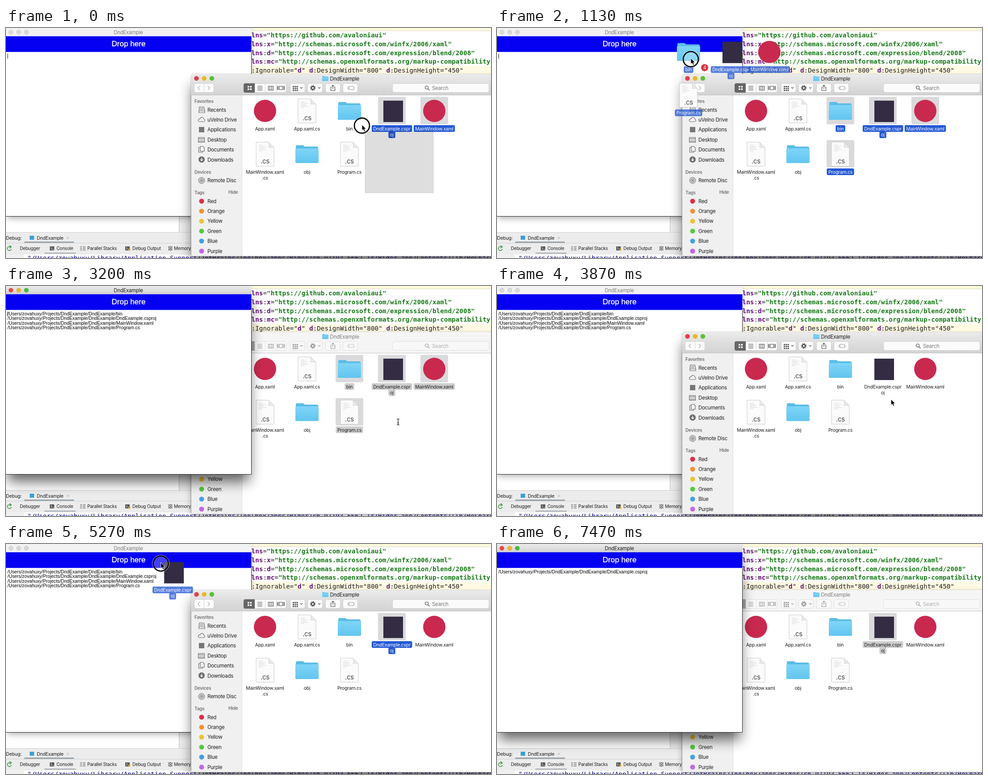
An HTML page for the animation above (7540 ms loop, 1086 px wide and 516 px high).

```html
<!DOCTYPE html>
<html lang="en">
<head>
<meta charset="utf-8">
<title>Drag and drop</title>
<style>
html, body { margin: 0; width: 100%; height: 100%; overflow: hidden; background: #fff; }
svg { display: block; width: 1086px; height: 516px; }
text { font-family: Inter, Roboto, sans-serif; font-size: 11.4px; letter-spacing: -.02em; fill: #1c1c1c; white-space: pre; }
.mid { text-anchor: middle; }
.code { font-family: "DejaVu Sans Mono", monospace; font-size: 14.33px; letter-spacing: 0; }
.ns { fill: #660e7a; font-weight: bold; }
.str { fill: #177a17; font-weight: bold; }
.path { font-family: "Liberation Sans", Arial, sans-serif; font-size: 10.35px; letter-spacing: 0; fill: #000; }
.tool { font-size: 10px; }
.head { font-size: 10px; font-weight: 600; fill: #707070; }
.label text { font-size: 10.4px; text-anchor: middle; }
.box, .tag { visibility: hidden; }
.on .box, .off .box, .on .tag, .off .tag { visibility: inherit; }
.on .tag { fill: #2458d3; }
.off .tag { fill: #cecece; }
.on text.name { fill: #fff; }
.ghost .box { visibility: hidden; }
.btn { fill: #fbfbfb; stroke: #cfcfcf; }
.ico { fill: none; stroke: #555; stroke-width: 1.2; }
.side { fill: none; stroke: #6c6c6c; stroke-width: 1.2; }
.idle .tools { opacity: .55; }
.idle .caption { fill: #7c7c7c; }
</style>
</head>
<body>
<svg id="stage" viewBox="0 0 1086 516" xmlns="http://www.w3.org/2000/svg">
<defs>
  <linearGradient id="bar" x2="0" y2="1"><stop stop-color="#ebebeb"/><stop offset="1" stop-color="#d2d2d2"/></linearGradient>
  <linearGradient id="sky" x2="0" y2="1"><stop stop-color="#7fd5f7"/><stop offset="1" stop-color="#62c5ef"/></linearGradient>
  <filter id="deep" filterUnits="userSpaceOnUse" x="-100" y="-100" width="1300" height="750"><feGaussianBlur stdDeviation="15"/></filter>
  <filter id="light" filterUnits="userSpaceOnUse" x="-100" y="-100" width="1300" height="750"><feGaussianBlur stdDeviation="8"/></filter>
</defs>
</svg>
<script>
const LOOP = 7540, STEP = 1000 / 15;
const USER = 'zovahuxy';
const stage = document.getElementById('stage');

const rect = (x, y, w, h, fill, more = '') => `<rect x="${x}" y="${y}" width="${w}" height="${h}" fill="${fill}" ${more}/>`;
const line = (d, more = 'class="ico"') => `<path d="${d}" ${more}/>`;
const dot = (x, y, r, fill, more = '') => `<circle cx="${x}" cy="${y}" r="${r}" fill="${fill}" ${more}/>`;
const text = (x, y, s, more = '') => `<text x="${x}" y="${y}" ${more}>${s}</text>`;
const span = (cls, s) => `<tspan class="${cls}">${s}</tspan>`;

// Code editor and debug panel behind both windows
function ide() {
  const xmlns = (p, url) => span('ns', 'lns') + (p ? ':' + span('ns', p) : '') + '=' + span('str', `"${url}"`);
  const ms = 'http://schemas.microsoft.com/';
  const rows = [
    xmlns('', 'https://github.com/avaloniaui'),
    xmlns('x', ms + 'winfx/2006/xaml'),
    xmlns('d', ms + 'expression/blend/2008'),
    xmlns('mc', 'http://schemas.openxmlformats.org/markup-compatibility/2006'),
    ':Ignorable="' + span('ns', 'd') + '" ' + span('ns', 'd') + ':DesignWidth="800" ' + span('ns', 'd') + ':DesignHeight="450"'
  ];
  const tabs = [[31, 'Debugger'], [113, 'Console'], [182, 'Parallel Stacks'], [283, 'Debug Output'], [376, 'Memory']];
  const log = `"/Users/${USER}/Library/Application Support/JetBrains/Toolbox/apps/Rider/ch-0/193.5662.14/Rider.app/Contents/lib/ReSharperHost`;
  return rect(0, 0, 1086, 516, '#fff') +
    rect(540, 0, 546, 6, '#fbf8dc') + line('M540 6.5H1086', 'stroke="#dedbc4"') +
    rect(540, 85, 546, 20, '#fffae3') +
    rows.map((r, i) => text(549.5, 21 + i * 19.8, r, 'class="code"')).join('') +
    rect(388, 400, 30, 59, '#ebebeb') + line('M387.5 400V459', 'stroke="#bdbdbd"') +
    rect(0, 459, 1086, 49, '#ececec') + line('M0 458.5H1086M0 482.5H1086', 'stroke="#d0d0d0"') +
    rect(0, 508, 40, 8, '#f0f0f0') +
    text(0, 475, 'Debug:', 'style="font-size:10.6px"') + rect(53, 466, 10, 9, '#3d9fd6') +
    text(69, 475, 'DndExample', 'style="font-size:10.4px"') +
    line('M136 468.500l5 5m0-5l-5 5', 'stroke="#aaa"') + rect(41, 479, 111, 3, '#9ba5ad') +
    tabs.map(([x, s]) => text(x, 498, s, 'class="tool"')).join('') +
    rect(86, 504, 70, 2, '#9ba5ad') +
    line('M10 491a4.500 4.500 0 1 0 2 5M8 488l4 3-4 3', 'fill="none" stroke="#4d9b51" stroke-width="1.7"') +
    rect(98, 490, 10, 9, '#555') + line('M100 492l3 2.500-3 2.500M104 497h3', 'stroke="#fff" fill="none"') +
    line('M166 491h4M166 494.500h4M166 498h4M172 491h6M172 494.500h6M172 498h6', 'stroke="#777" stroke-width="1.5"') +
    rect(267, 490, 10, 9, '#555') + line('M269 492l3 2.500-3 2.500', 'stroke="#fff" fill="none"') + dot(276, 497, 2.5, '#d99a28') +
    dot(368, 494.5, 3.5, 'none', 'class="ico"') + dot(368, 494.5, 1.5, '#444') +
    line('M363 491h3M363 498h3M370 491h3M370 498h3M368 489v2M368 498v2') +
    text(48, 521, log, 'class="code" style="fill:#000080"');
}

const folder = (x, y) => `<g transform="translate(${x} ${y})">` +
  line('M-25-17q0-3 3-3h13l4 3h27q3 0 3 3v10h-50z', 'fill="#5bbde6"') +
  rect(-26, -13, 52, 33, 'url(#sky)', 'rx="2"') + '</g>';

const page = (x, y) => {
  const rows = [0, 1, 2, 3, 4].map(i => `M-14 ${-20 + i * 3.2}h${[9, 15, 12, 17, 8][i]}`).join('');
  return `<g transform="translate(${x} ${y})">` +
    line('M-20-27H8L20-15V27H-20Z', 'fill="#fbfbfb" stroke="#c9c9c9"') +
    line('M8-27Q10-18 8-15Q14-16 20-15Z', 'fill="#e9e9e9" stroke="#d2d2d2"') +
    line(rows, 'stroke="#cdcdcd" stroke-width=".8"') +
    text(0, 21, '.cs', 'class="mid" style="font-size:15px;fill:#444"') + '</g>';
};
const round = (x, y) => dot(x, y, 25, '#c9294f');
const square = (x, y) => rect(x - 19, y - 23, 44, 48, '#332c43');

const files = {
  app: [580, 186, round, ['App.xaml']],
  appCs: [674, 186, page, ['App.xaml.cs']],
  bin: [769, 186, folder, ['bin']],
  proj: [864, 186, square, ['DndExample.cspr', 'oj']],
  main: [959, 186, round, ['MainWindow.xaml']],
  mainCs: [580, 283, page, ['MainWindow.xaml', '.cs']],
  obj: [674, 283, folder, ['obj']],
  prog: [769, 283, page, ['Program.cs']]
};

function item(key, cls = '') {
  const [x, y, icon, names] = files[key];
  return `<g class="${cls}" data-file="${key}">` + rect(x - 31, y - 31.5, 62, 61.5, '#dadadc', 'rx="3" class="box"') + icon(x, y) +
    '<g class="label">' + names.map((s, i) =>
      rect(x, y + 32 + i * 14, 0, 15, '#2458d3', 'rx="3" class="tag"') +
      text(x, y + 43.5 + i * 13.5, s, 'class="name"')).join('') + '</g></g>';
}

// Focused windows cast a deep shadow, others a light one
function shades(id, x, y, w, h) {
  return `<g id="${id}Deep" opacity=".6">` + rect(x + 4, y + 25, w - 8, h - 8, '#000', 'filter="url(#deep)"') + '</g>' +
    `<g id="${id}Light" opacity=".35">` + rect(x + 2, y + 8, w - 4, h - 4, '#000', 'filter="url(#light)"') + '</g>';
}

function appWindow() {
  return '<g id="app">' + shades('app', 0, 0, 549, 422) +
    rect(0, 0, 549.5, 422, '#fff') + rect(0, 0, 549.5, 19, '#f2f2f2', 'id="appBar"') +
    [11, 28.5, 45.5].map(x => dot(x, 9.5, 5, '#d9d9d9', 'class="light" stroke="#0002" stroke-width=".8"')).join('') +
    text(274, 14, 'DndExample', 'class="mid caption"') +
    rect(0, 18.5, 549.5, 35.2, '#0500f2') +
    text(274.5, 40.5, 'Drop here', 'class="path mid" style="font-size:17.1px;fill:#fff;stroke:#fff;stroke-width:.4"') +
    '<g id="lines"></g>' + rect(3.3, 57.5, 1, 11, '#000', 'id="caret"') +
    line('M0 422.500H549.500V54', 'fill="none" stroke="#222"') + '</g>';
}

function toolbar() {
  const btn = (x, w) => rect(x + .5, 124.5, w, 20, '#fbfbfb', 'class="btn" rx="4"');
  const grid = (x, y, step, n, m, s, fill) => {
    let out = '';
    for (let i = 0; i < n * m; i++) out += rect(x + (i % n) * step, y + (i / n | 0) * step, s, s, fill);
    return out;
  };
  const chev = x => line(`M${x} 133l2.500 2.500 2.500-2.500`);
  return '<g class="tools">' + btn(421, 44) + line('M443.500 125V144', 'stroke="#d5d5d5"') +
    line('M434 130l-4 4.500 4 4.500M452 130l4 4.500-4 4.500', 'fill="none" stroke="#b3b3b3" stroke-width="1.4"') +
    btn(532, 95) + line('M605.500 125V144M580.500 125V144', 'stroke="#d5d5d5"') +
    line('M557 124H536q-4 0-4 4v13q0 4 4 4h21z', 'fill="#666"') + grid(541, 130, 5.5, 2, 2, 3.5, '#fff') +
    line('M563 130.500h11M563 133.500h11M563 136.500h11M563 139.500h11') +
    line('M587.500 130.500h11v9h-11zM591 130.500v9M595 130.500v9') +
    line('M612 130.500h7v8h-7zM609.500 130v9M621.500 130v9M607.500 130v9M623.500 130v9') +
    btn(636, 33) + grid(642, 130, 4.3, 3, 3, 3, '#555') + chev(659) +
    btn(675, 33) + dot(687, 134.5, 3.4, 'none', 'stroke="#555" stroke-width="2.6"') +
    dot(687, 134.5, 5.4, 'none', 'stroke="#555" stroke-width="1.6" stroke-dasharray="2.1 2.14"') + chev(699) +
    btn(715, 33) + line('M729.500 132.500h-2v8h9v-8h-2M732 137v-9m-2.500 2.500l2.500-2.500 2.500 2.500') +
    btn(754, 33) + line('M768 131h9q2 0 2 2v3q0 2-2 2h-9l-3-3.500z', 'fill="none" stroke="#999" stroke-width="1.2"') + dot(768.5, 134.5, 1, '#999') +
    btn(865, 216) + dot(942, 133.5, 3.5, 'none', 'class="ico"') + line('M944.500 136l4 4') +
    text(954, 139, 'Search', 'style="fill:#777"') + '</g>';
}

function sidebar() {
  const places = ['Recents', 'uVelno Drive', 'Applications', 'Desktop', 'Documents', 'Downloads'];
  const tags = [['Red', '#db3049'], ['Orange', '#ee9430'], ['Yellow', '#eac436'], ['Green', '#55c940'], ['Blue', '#459fe0'], ['Purple', '#bf69e2']];
  return rect(414, 151, 114, 361, '#f0f0f0') + line('M528.500 151V512', 'stroke="#dcdcdc"') +
    text(422, 167.5, 'Favorites', 'class="head"') + text(422, 326.5, 'Devices', 'class="head"') +
    text(422, 373, 'Tags', 'class="head"') + text(498, 372, 'Hide', 'class="head"') +
    places.map((s, i) => text(451, 187.5 + i * 22.4, s)).join('') + text(451, 346, 'Remote Disc') +
    tags.map(([s, c], i) => text(451, 392.5 + i * 22.4, s) + dot(438, 388.5 + i * 22.4, 5.5, c)).join('') +
    line('M433 177h10l2 9v4h-13v-4zM432 186h13M434 180h8M434 183h8', 'class="side"') +
    line('M434 210q-4 0-3.500-3.500 1-3 4-2.500 1.500-4 5-3.500 3.500 1 3.500 4 3 1 2 4-1 1.500-2.500 1.500z', 'class="side"') +
    rect(432, 222, 12, 12, '#777') +
    rect(430.5, 245.5, 14, 11, '#ddd', 'stroke="#6c6c6c"') + line('M431 248.500h13M431 254h13', 'class="side"') +
    line('M435 265.500h6l3 3v8h-9zM435 268h-3.500v11h9v-2', 'class="side"') +
    dot(438, 295, 7, '#6c6c6c') + line('M438 291v7m-3-3l3 3 3-3', 'fill="none" stroke="#fff" stroke-width="1.5"') +
    dot(438, 342, 7, '#ccc', 'stroke="#777"') + dot(438, 342, 3.5, 'none', 'stroke="#888"') + dot(438, 342, 1.5, '#777');
}

function finder() {
  const lights = ['#e2414b', '#e9b828', '#5bc035'];
  return '<g id="finder">' + shades('finder', 414, 103, 690, 409) +
    rect(414, 103, 690, 409, '#fff', 'rx="5" stroke="#0003"') +
    line('M414 151V108q0-5 5-5H1090V151z', 'fill="url(#bar)" id="finderBar"') +
    line('M414 150.500H1086', 'stroke="#c3c3c3"') +
    lights.map((c, i) => dot(426.5 + i * 17.2, 113, 5.3, c)).join('') +
    `<g transform="translate(715 113.500) scale(.27)">${folder(0, 0)}</g>` +
    text(725.5, 117.5, 'DndExample', 'class="caption"') + toolbar() + sidebar() +
    Object.keys(files).map(k => item(k)).join('') +
    rect(0, 0, 0, 0, '#000', 'id="marquee" fill-opacity=".13" stroke="#000" stroke-opacity=".1"') +
    line('M414.500 150V507q0 5 5 5H1086', 'fill="none" stroke="#a9a9a9"') + '</g>';
}

function pointer() {
  return '<g id="ghosts">' + ['bin', 'proj', 'main', 'prog'].map(k => item(k, 'on ghost')).join('') + '</g>' +
    '<g id="badge">' + dot(0, 0, 8, '#dc303c') + text(0, 4, '4', 'class="mid" style="fill:#fff"') + '</g>' +
    '<g id="cursor"><g id="ring">' + dot(0, 0, 19, 'none', 'stroke="#fff" stroke-opacity=".7"') +
    dot(0, 0, 17, '#fff', 'fill-opacity=".25" stroke="#0a0a0a" stroke-width="2.8"') + '</g>' +
    line('M0-2V11l3-2.700 2 5 2.500-1-2-4.800h4z', 'id="arrow" fill="#000" stroke="#fff" stroke-width=".9"') +
    line('M-3-7q3 0 3 2.500V4.500q0 2.500-3 2.500M3-7q-3 0-3 2.500M0 4.500q0 2.500 3 2.500M-2 2H2', 'id="beam" fill="none" stroke="#111" stroke-width="1.2"') + '</g>';
}

stage.insertAdjacentHTML('beforeend', ide() + '<g id="windows">' + appWindow() + finder() + '</g>' + pointer());
const $ = id => document.getElementById(id);
const show = (el, on) => el.setAttribute('visibility', on ? 'inherit' : 'hidden');
const move = (el, x, y) => el.setAttribute('transform', `translate(${x} ${y})`);

for (const tag of stage.querySelectorAll('.tag')) {
  const b = tag.nextElementSibling.getBBox();
  tag.setAttribute('x', b.x - 3.5);
  tag.setAttribute('width', b.width + 7);
}

const items = [...$('finder').querySelectorAll('[data-file]')];
const ghosts = [...$('ghosts').children];

// Moments of the story, ms
const T = {
  both: 130, free: 400, press: 600, grab: 700, raise: 2130, focus: 2300, drop: 2600, beam: 2660,
  back: 3670, pick: 4270, grab2: 4370, raise2: 5800, focus2: 5930, drop2: 6330, beam2: 6400
};

// Pointer path: time, x, y
const path = [
  [0, 797, 219], [130, 776, 208], [270, 765, 200], [400, 764, 199], [580, 778, 208], [700, 778, 208],
  [900, 600, 135], [1040, 438, 76], [1130, 434, 70], [1600, 425, 62], [2050, 407, 50], [2660, 407, 50],
  [2950, 690, 220], [3190, 878, 305], [3450, 878, 305], [3670, 890, 300], [4200, 869, 182], [4370, 869, 182],
  [4510, 746, 177], [4600, 702, 171], [5000, 440, 90], [5300, 335, 38], [5880, 319, 29.5], [6400, 319, 29.5],
  [6900, 700, 560], [7540, 700, 560]
];

function at(t) {
  const i = Math.max(1, path.findIndex(p => p[0] >= t));
  const [a, b] = [path[i - 1], path[i]];
  const u = Math.max(0, (t - a[0]) / (b[0] - a[0]));
  return [a[1] + (b[1] - a[1]) * u, a[2] + (b[2] - a[2]) * u];
}

function selected(t, x) {
  if (t < T.both) return ['proj', 'main'];
  if (t < T.back) return ['bin', 'proj', 'main', 'prog'];
  if (t < T.pick) return [];
  const overBin = t < T.raise2 && x > 695 && x < 800;
  return overBin ? ['proj', 'bin'] : ['proj'];
}

let lastLines = -1;
function setLines(n) {
  if (n === lastLines) return;
  lastLines = n;
  const names = n === 4 ? ['bin', 'DndExample.csproj', 'MainWindow.xaml', 'Program.cs'] : n ? ['DndExample.csproj'] : [];
  $('lines').innerHTML = names.map((s, i) =>
    text(3.3, 65.7 + i * 10.4, `/Users/${USER}/Projects/DndExample/DndExample/${s}`, 'class="path"')).join('');
}

function setFocus(id, on) {
  $(id).setAttribute('class', on ? '' : 'idle');
  show($(id + 'Deep'), on);
  show($(id + 'Light'), !on);
}

function draw(t) {
  const within = (a, b) => t >= a && t < b;
  const appFront = within(T.raise, T.back) || t >= T.raise2;
  const appActive = within(T.focus, T.back) || t >= T.focus2;
  const [x, y] = at(t);

  const top = appFront ? $('app') : $('finder');
  if ($('windows').lastElementChild !== top) $('windows').append(top);
  setFocus('app', appActive);
  setFocus('finder', !appActive);
  $('appBar').setAttribute('fill', appActive ? 'url(#bar)' : '#f2f2f2');
  $('finderBar').setAttribute('fill', appActive ? '#f5f5f5' : 'url(#bar)');
  const lights = appActive ? ['#ee4840', '#eeb52c', '#43bd3c'] : ['#d9d9d9', '#d9d9d9', '#d9d9d9'];
  $('app').querySelectorAll('.light').forEach((el, i) => el.setAttribute('fill', lights[i]));

  setLines(t < T.drop ? 0 : t < T.drop2 ? 4 : 1);
  const blink = Math.floor((t - (t < T.back ? T.raise : T.raise2)) / 500) % 2 === 0;
  show($('caret'), t < T.drop || appActive && blink);

  const chosen = selected(t, x);
  for (const el of items) {
    el.setAttribute('class', chosen.includes(el.dataset.file) ? appActive ? 'off' : 'on' : '');
  }

  const m = $('marquee');
  show(m, t < T.free);
  const mx = x + 7, my = y + 13;
  Object.entries({ x: mx, y: my, width: Math.max(0, 957 - mx), height: Math.max(0, 370 - my) }).forEach(([k, v]) => m.setAttribute(k, v));

  // Dragged copies trail the pointer slightly
  const many = within(T.grab, T.drop), one = within(T.grab2, T.drop2);
  const [gx, gy] = at(Math.max(t - 90, many ? T.grab : T.grab2));
  const dx = gx - (many ? 778 : 869), dy = gy - (many ? 208 : 182);
  for (const g of ghosts) {
    const key = g.dataset.file;
    show(g, many || one && key === 'proj');
    move(g, dx - (key === 'main' && many && t < 1600 ? 9 : 0), dy);
    g.querySelector('.label').setAttribute('opacity', appFront ? 1 : .78);
  }
  show($('badge'), many);
  move($('badge'), x + (t < 1600 ? 31 : 26), y + (t < 1600 ? 19 : 17));

  const beam = within(T.beam, T.back) || t >= T.beam2;
  move($('cursor'), x, y);
  show($('beam'), beam);
  show($('arrow'), !beam);
  show($('ring'), t < T.free || within(T.press, T.drop) || within(T.back - 70, T.back + 70) || within(T.pick, T.drop2));
}

const start = performance.now();
function tick() {
  const t = (performance.now() - start) % LOOP;
  draw(Math.floor((t + 4) / STEP) * STEP);
  requestAnimationFrame(tick);
}
tick();
</script>
</body>
</html>
```
